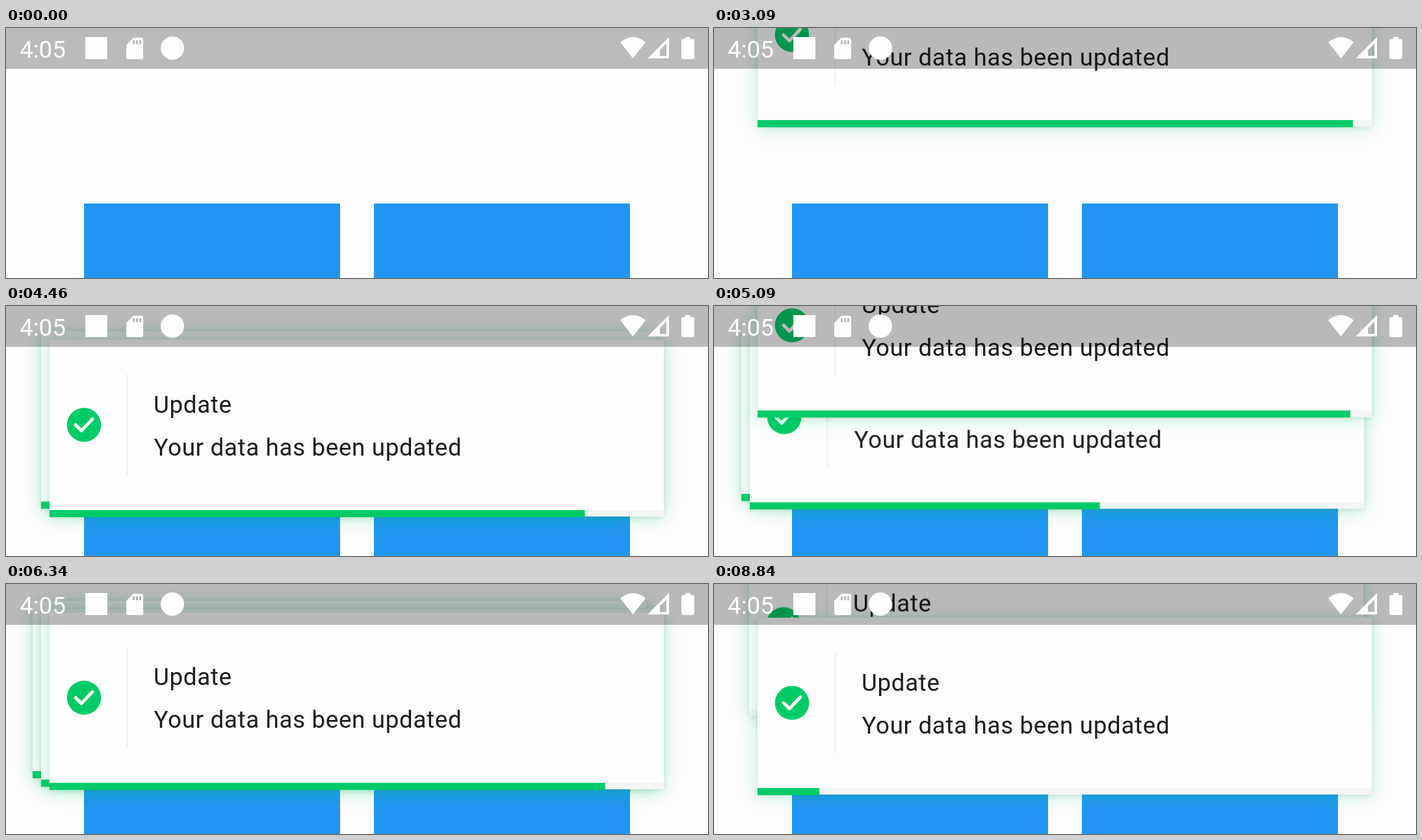
An HTML page for the animation above (8890 ms loop, 1080x386 px).

```html
<!DOCTYPE html>
<html lang="en">
<head>
<meta charset="utf-8">
<title>Stacked notifications</title>
<style>
html, body { margin: 0; width: 100%; height: 100%; overflow: hidden; background: #fdfcfe; }
#stage { position: relative; width: 1080px; height: 386px; overflow: hidden; font-family: Roboto, sans-serif; }
.button { position: absolute; top: 270.500px; width: 394px; height: 130px; background: #2196f3; }
.card {
  position: absolute; left: 67px; top: 52px; width: 945px; height: 273px;
  background: #fdfdfd; visibility: hidden; will-change: transform;
  box-shadow: 0 3px 26px rgba(1, 203, 103, .26), 0 2px 8px rgba(0, 0, 0, .09);
}
.card svg { position: absolute; left: 0; top: 0; }
.card text { font-size: 36.75px; letter-spacing: .656px; fill: #1c1b1f; }
.track { position: absolute; left: 0; bottom: 0; width: 100%; height: 10.5px; background: #f3f5f3; }
.bar { width: 100%; height: 100%; background: #01cb67; transform-origin: 0 0; }
#status { position: absolute; left: 0; top: 0; }
</style>
</head>
<body>
<div id="stage">
  <div class="button" style="left:120px"></div>
  <div class="button" style="left:566px"></div>
  <div id="cards"></div>
  <svg id="status" width="1080" height="63" fill="#fefefe">
    <rect width="1080" height="63" fill="#000" fill-opacity=".265"/>
    <text x="21" y="46" font-size="36.75">4:05</text>
    <rect x="122" y="14" width="34" height="34"/>
    <path fill-rule="evenodd" d="M196 15H208Q211 15 211 18V45Q211 48 208 48H188Q185 48 185 45V26ZM195 19V25H198V19ZM200 19V25H203V19ZM205 19V25H208V19Z"/>
    <circle cx="256" cy="31" r="18"/>
    <path d="M945 22Q964.500 6 984 22L964.500 47Z"/>
    <path fill-rule="evenodd" d="M987 47L1020 14V47ZM1006 34V43H1016V24Z"/>
    <path d="M1045 14H1053V17H1056Q1059 17 1059 20V45Q1059 48 1056 48H1042Q1039 48 1039 45V20Q1039 17 1042 17H1045Z"/>
  </svg>
</div>
<script>
const LOOP = 8890;
const TAPS = [2718, 3713, 4693, 5694, 6505];
const LIFE = 3000;     // from tap until the card leaves
const DELAY = 120;     // from tap until the card slides in
const SLIDE = 600;
const TRAVEL = 273;    // one card height
const SHIFT = 500;     // time to move one place back
const STEP = 13;       // offset between stacked cards

const clamp = v => Math.min(1, Math.max(0, v));

// Cubic Bézier easing, solved by bisection
function bezier(x1, y1, x2, y2) {
  const at = (a, b, s) => 3 * a * s * (1 - s) ** 2 + 3 * b * s * s * (1 - s) + s ** 3;
  return v => {
    const x = clamp(v);
    if (x === 0 || x === 1) return x;
    let lo = 0, hi = 1;
    for (let i = 0; i < 20; i++) {
      const mid = (lo + hi) / 2;
      if (at(x1, x2, mid) < x) lo = mid; else hi = mid;
    }
    return at(y1, y2, lo);
  };
}
const ease = bezier(.25, .1, .25, 1);
const easeInOut = bezier(.42, 0, .58, 1);

const markup = `
  <svg width="945" height="273">
    <circle cx="53" cy="131.500" r="26.300" fill="#01cb67"/>
    <path d="M40 131.500L49 140.500L66 122.500" fill="none" stroke="#fefefe" stroke-width="5"
      stroke-linecap="round" stroke-linejoin="round"/>
    <path d="M119.500 53V210" stroke="#eeefee" stroke-width="2"/>
    <text x="160" y="112.500">Update</text>
    <text x="160.500" y="178.500">Your data has been updated</text>
  </svg>
  <div class="track"><div class="bar"></div></div>`;

const cards = TAPS.map(tap => {
  const el = document.createElement('div');
  el.className = 'card';
  el.innerHTML = markup;
  document.getElementById('cards').append(el);
  return { tap, el, bar: el.querySelector('.bar') };
});

function draw(t) {
  cards.forEach(({ tap, el, bar }, i) => {
    const age = t - tap;
    const enter = (age - DELAY) / SLIDE;
    const leave = (age - LIFE) / SLIDE;
    const places = TAPS.slice(i + 1)
      .reduce((sum, next) => sum + easeInOut((t - next) / SHIFT), 0);
    const back = -STEP * places;
    const rise = TRAVEL * (1 - easeInOut(enter) + ease(leave));
    el.style.visibility = enter > 0 && leave < 1 ? 'visible' : 'hidden';
    el.style.transform = `translate(${back}px, ${back - rise}px)`;
    bar.style.transform = `scaleX(${1 - easeInOut(age / LIFE)})`;
  });
}

const begin = performance.now();
function tick() {
  draw((performance.now() - begin) % LOOP);
  requestAnimationFrame(tick);
}
draw(0);
requestAnimationFrame(tick);
</script>
</body>
</html>
```
